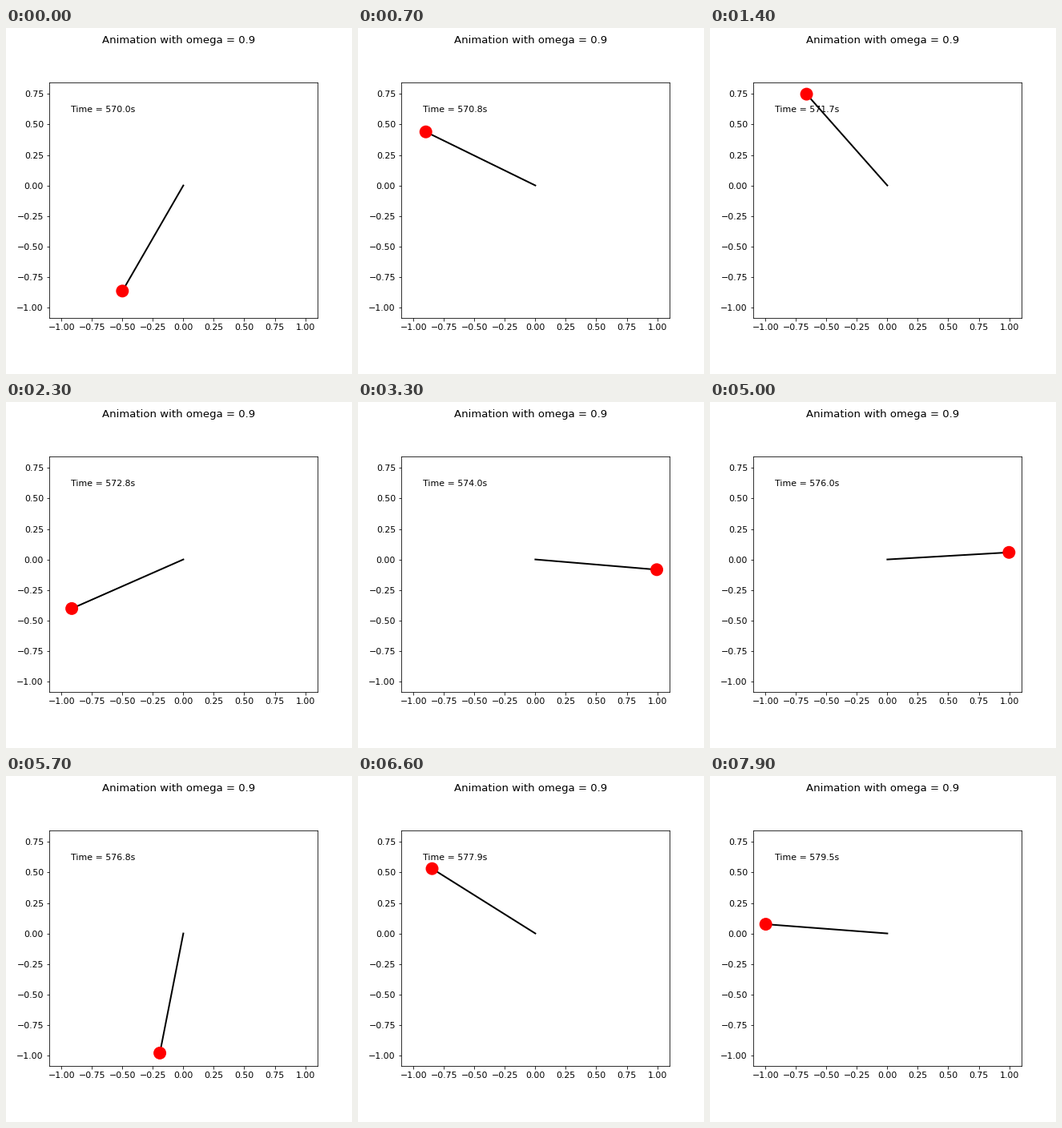
These frames come from a looping animation (432 px wide and 432 px high, 8 s). A matplotlib script:

```python
import numpy as np
import matplotlib.pyplot as plt
from matplotlib.animation import FuncAnimation

FRAMES, INTERVAL = 80, 100
START, STEP = 570.0, 0.12   # simulated seconds
OMEGA = 0.9
TOP = 0.759                 # highest point the bob reaches


def angle(t):
    """Steady swing of the driven pendulum, clockwise from straight down."""
    u = OMEGA * (t - START + 0.223)
    return (2.484 * np.sin(u) + 0.053 * np.sin(3 * u)
            + 0.012 * (np.cos(3 * u) - np.cos(u)))


plt.rcParams.update({"font.family": "DejaVu Sans", "font.size": 11})
fig, ax = plt.subplots(figsize=(6, 6), dpi=72)
fig.subplots_adjust(left=0.125, right=0.9, bottom=0.125, top=0.88)
fig.suptitle(f"Animation with omega = {OMEGA}")

pad = 0.05 * (1 + TOP)
ax.set_aspect("equal")
ax.set_xlim(-1.1, 1.1)
ax.set_ylim(-1 - pad, TOP + pad)
ax.set_xticks(np.arange(-1, 1.01, 0.25))
ax.set_yticks(np.arange(-1, 0.76, 0.25))

rod, = ax.plot([], [], color="k", lw=2)
bob = ax.add_patch(plt.Circle((0, -1), 0.0525, fc="r", zorder=3))
clock = ax.text(-0.92, 0.6, "", zorder=4)


def update(i):
    t = START + STEP * i
    a = angle(t)
    x, y = -np.sin(a), -np.cos(a)
    rod.set_data([0, x], [0, y])
    bob.center = x, y
    clock.set_text(f"Time = {t:.1f}s")
    return rod, bob, clock


anim = FuncAnimation(fig, update, frames=FRAMES, interval=INTERVAL,
                     repeat=True, repeat_delay=0)
plt.show()
```
